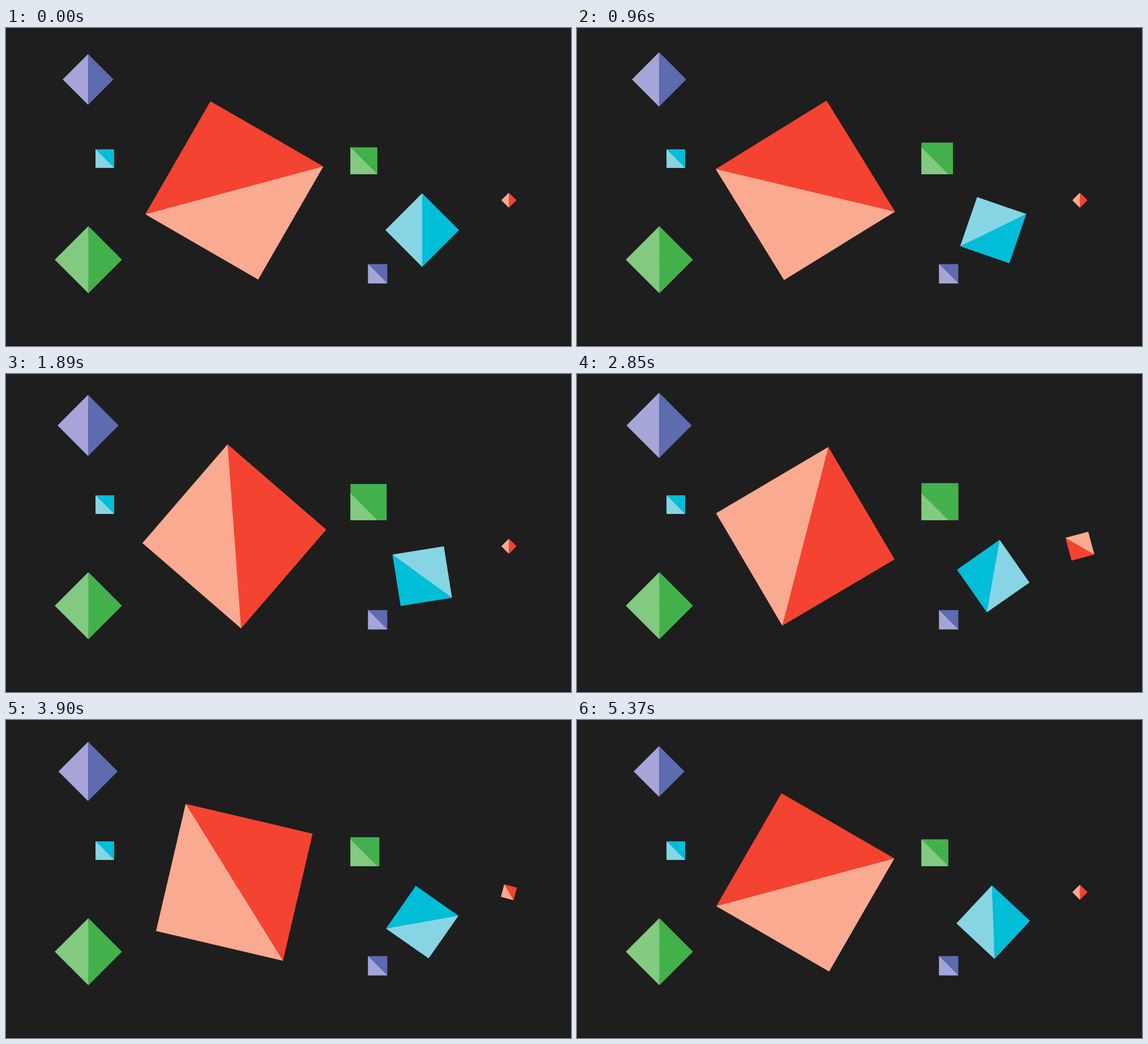
An HTML page for the animation above (5400 ms loop, 998 by 561 pixels).

```html
<!DOCTYPE html>
<html lang="en">
<head>
<meta charset="utf-8">
<title>Floating squares</title>
<style>
html, body { margin: 0; width: 100%; height: 100%; overflow: hidden; background: #1e1e1e; }
svg { display: block; width: 100%; height: 100%; }
</style>
</head>
<body>
<svg id="stage" viewBox="0 0 998 561"></svg>
<script>
const LOOP = 5400, STEP = 30;
const stage = document.getElementById('stage');
const colors = {
  red: ['#f44331', '#fbaa92'],
  cyan: ['#00bdd8', '#87d5e4'],
  purple: ['#5d6bb1', '#a5a5d8'],
  green: ['#43b14b', '#81ca80']
};

function add(parent, tag, attrs) {
  const el = document.createElementNS('http://www.w3.org/2000/svg', tag);
  for (const key in attrs) el.setAttribute(key, attrs[key]);
  return parent.appendChild(el);
}

// Two-tone diamond; the light half points left at angle 0.
function diamond(color, x, y, radius) {
  const [dark, light] = colors[color];
  const group = add(stage, 'g', {});
  add(group, 'path', { d: 'M0-1L1 0L0 1L-.02 0z', fill: dark });
  add(group, 'path', { d: 'M0-1L-1 0L0 1z', fill: light });
  const pose = (angle, r) =>
    group.setAttribute('transform', `translate(${x} ${y}) rotate(${angle}) scale(${r})`);
  pose(0, radius);
  return pose;
}

// Upright square anchored bottom left, with a light triangle of fixed size.
function square(color, x, bottom, size) {
  const [dark, light] = colors[color];
  const back = add(stage, 'path', { fill: dark });
  add(stage, 'path', { d: `M${x} ${bottom}v${-size}l${size} ${size}z`, fill: light });
  const resize = s => back.setAttribute('d', `M${x} ${bottom}v${-s}h${s}v${s}z`);
  resize(size);
  return resize;
}

// Easing with level tangents; a and b are the handles' time positions.
function ease(x, a, b) {
  if (x <= 0) return 0;
  if (x >= 1) return 1;
  let lo = 0, hi = 1, s = 0.5;
  for (let i = 0; i < 24; i++) {
    s = (lo + hi) / 2;
    const time = 3 * a * s * (1 - s) ** 2 + 3 * b * s * s * (1 - s) + s ** 3;
    if (time < x) lo = s; else hi = s;
  }
  return s * s * (3 - 2 * s);
}

// Rises from 0 to 1 between start and peak, then falls back until end.
function swell(t, start, peak, end, rise, fall) {
  return t < peak
    ? ease((t - start) / (peak - start), ...rise)
    : 1 - ease((t - peak) / (end - peak), ...fall);
}

const SOFT = [0.167, 0.833], STRONG = [0.5, 0.5];

const purpleTop = diamond('purple', 145, 90.7, 44.8);
square('cyan', 158.2, 246.8, 32.8);
diamond('green', 145.5, 408.7, 59.3);
const bigRed = diamond('red', 403.3, 286.4, 162.8);
const greenBox = square('green', 608.4, 257.9, 47.5);
const cyanSpinner = diamond('cyan', 735.2, 356.6, 65);
square('purple', 639.5, 450.4, 34);
const smallRed = diamond('red', 888.3, 303.8, 13.4);
add(stage, 'rect', { y: 560, width: 998, height: 1, fill: '#0c0c0c' });

function draw(t) {
  bigRed(-105 + 120 * swell(t, 0, 2700, LOOP, STRONG, STRONG), 162.8);
  cyanSpinner(360 * t / LOOP, 65);
  purpleTop(0, 44.8 + 13.1 * swell(t, 270, 2700, LOOP, SOFT, SOFT));
  greenBox(47.5 + 18.4 * swell(t, 0, 2700, LOOP, [0.266, 0.427], [0.2, 0.106]));
  const turn = Math.min(1, Math.max(0, (t - 2250) / 1800));
  smallRed(360 * turn, 13.4 + 24.8 * swell(t, 2250, 3150, 4050, [0.3, 0.84], SOFT));
}

const began = performance.now();
function tick() {
  const t = (performance.now() - began) % LOOP;
  draw(Math.floor(t / STEP) * STEP);
  requestAnimationFrame(tick);
}
tick();
</script>
</body>
</html>
```
